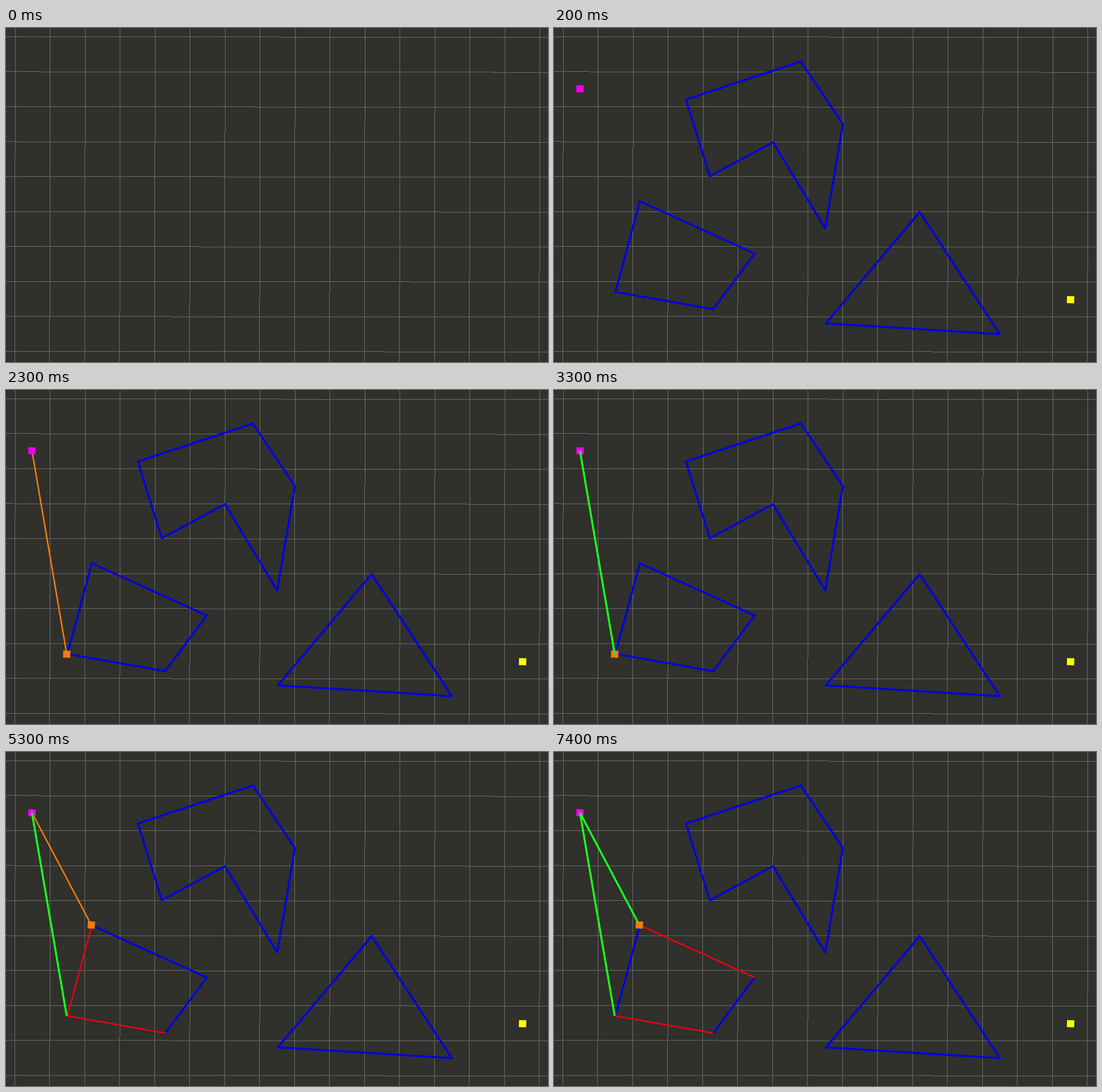
An HTML page that plays this animation: 953x588 px, repeating every 8000 ms.

```html
<!DOCTYPE html>
<html lang="en">
<head>
<meta charset="utf-8">
<title>Visibility graph sweep</title>
<style>
html, body { margin: 0; width: 100%; height: 100%; overflow: hidden; background: #30302c; }
svg { display: block; width: 100%; height: 100%; }
</style>
</head>
<body>
<svg id="stage" viewBox="0 0 953 588"></svg>
<script>
(() => {
  const LOOP = 8000;
  const BLUE = '#0000e4', RED = '#f0000c', GREEN = '#1cff1c', ORANGE = '#f27c0c';
  const THICK = 3.5, THIN = 2.6;
  const stage = document.getElementById('stage');
  const timed = [];

  // Adds a shape that is visible from `from` up to `until` (ms).
  function add(tag, attrs, from = 0, until = LOOP) {
    const node = document.createElementNS('http://www.w3.org/2000/svg', tag);
    for (const key in attrs) node.setAttribute(key, attrs[key]);
    stage.append(node);
    timed.push({ node, from, until });
  }

  function line([x1, y1], [x2, y2], stroke, width, from, until, extra) {
    add('line', { x1, y1, x2, y2, stroke, 'stroke-width': width, ...extra }, from, until);
  }

  function outline(points, from) {
    add('polygon', {
      points: points.join(' '), fill: 'none', stroke: BLUE,
      'stroke-width': THICK, 'stroke-linejoin': 'round'
    }, from);
  }

  function edge(a, b, from, until) {
    line(a, b, BLUE, THICK, from, until, { 'stroke-linecap': 'round' });
  }

  function openEdge(a, b, from, until) {
    line(a, b, RED, THIN, from, until);
  }

  function marker([x, y], fill, from, until) {
    add('rect', {
      x: x - 6.4, y: y - 6.2, width: 12.8, height: 12.4, fill,
      transform: `rotate(2 ${x} ${y})`
    }, from, until);
  }

  const start = [45.7, 107], goal = [908.3, 478.3];
  const firstVertex = [106.8, 465], secondVertex = [150, 304.5];
  const quadTop = [151, 305], quadRight = [353, 397];
  const quadBottom = [280, 495], quadLeft = [108, 464.6];

  // Slightly rotated grid
  const crisp = { 'shape-rendering': 'crispEdges' };
  for (let i = 0; i < 16; i++) {
    const x = 16.4 + i * 61.49;
    line([x, 0], [x - 1, 588], '#6d6d6b', 1, 0, LOOP, crisp);
  }
  for (let i = 0; i < 10; i++) {
    const y = 15.4 + i * 61.53;
    line([0, y], [953, y + 1.2], '#6d6d6b', 1, 0, LOOP, crisp);
  }

  // Obstacles
  outline([[434, 59], [508, 169], [477, 353], [385, 201], [274, 261], [232, 126]], 100);
  outline([[643, 324], [784, 539], [478, 520]], 100);
  edge(quadRight, quadBottom, 100);
  edge(quadTop, quadRight, 100, 7400);
  edge(quadLeft, quadBottom, 100, 4300);
  edge(quadLeft, quadTop, 100, 4300);
  edge(quadLeft, quadTop, 7400);

  // Sweep rays stay below the markers
  line(start, firstVertex, ORANGE, THIN, 2300, 3300);
  line(start, secondVertex, ORANGE, THIN, 5300, 6400);
  marker(start, '#f000f0', 200);
  marker(goal, '#ffff00', 200);
  marker(firstVertex, ORANGE, 2200, 5300);

  openEdge(quadLeft, quadTop, 4300, 7400);
  openEdge(quadLeft, quadBottom, 4300);
  openEdge(quadTop, quadRight, 7400);

  // Visible connections
  line(start, firstVertex, GREEN, THICK, 3300);
  line(start, secondVertex, GREEN, THICK, 6400);
  marker(secondVertex, ORANGE, 5300);

  function draw(now) {
    const time = now % LOOP;
    for (const { node, from, until } of timed) {
      node.style.display = time >= from && time < until ? '' : 'none';
    }
    requestAnimationFrame(draw);
  }
  draw(0);
})();
</script>
</body>
</html>
```
